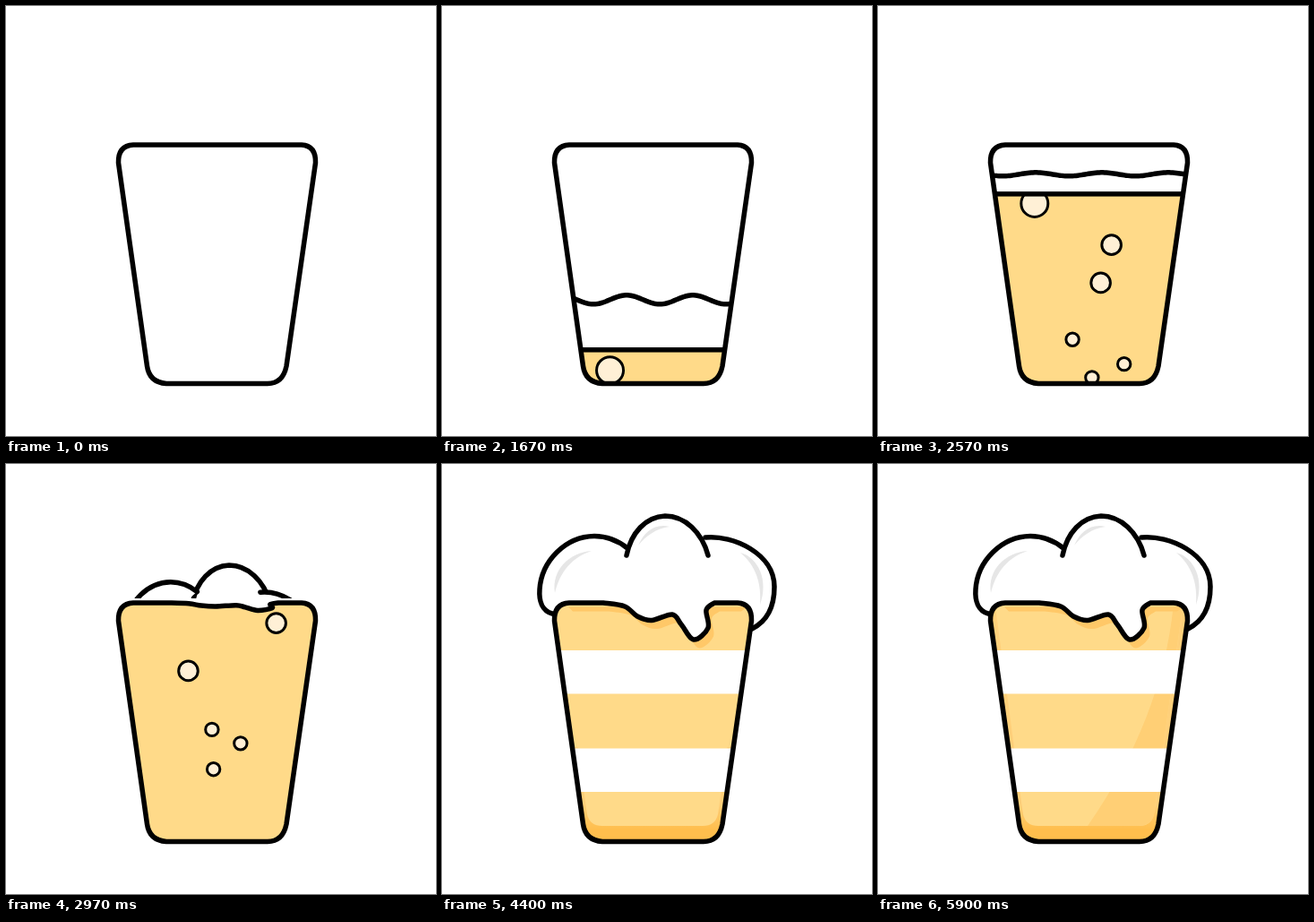
Write an HTML page with a canvas that moves like this. It is 480x480 px and loops after 9030 ms.

```html
<!DOCTYPE html>
<html lang="en">
<head>
<meta charset="utf-8">
<title>Filling glass</title>
<style>
  html, body { margin: 0; height: 100%; overflow: hidden; background: #fff; }
  canvas { display: block; width: 100%; height: 100%; }
</style>
</head>
<body>
<canvas id="stage" width="480" height="480"></canvas>
<script>
const ctx = document.getElementById('stage').getContext('2d');
const LOOP = 9030, RIM = 155, BASE = 421.5;
const AMBER = '#ffda89', SHADE = '#ffcf75', DEEP = '#ffbe4d';

const progress = (t, from, to) => Math.max(0, Math.min(1, (t - from) / (to - from)));
const lerp = (a, b, k) => a + (b - a) * k;
const easeOut = p => 1 - (1 - p) ** 2;
const easeInOut = p => p < .5 ? 2 * p * p : 1 - 2 * (1 - p) ** 2;

// Key points along the lower edge of the finished foam
const DRIP = [[180, 155], [204, 159], [218, 170], [234, 174.5], [257, 168],
  [267, 179], [281, 196], [297, 183], [295, 163], [304, 155]];

// Each puff swells out of its own anchor point
const puff = (x, y, shrink, line, gloss) =>
  ({ x, y, shrink, line: new Path2D(line), gloss: new Path2D(gloss) });
const PUFFS = [
  puff(250, 1158, .092, 'M206 102C211 77 227 59 249 58C271 58 290 76 297 102',
    'M219 91C226 75 238 66 254 70C239 72 228 80 219 91Z'),
  puff(239, 338, .366, 'M123 167C112 164 108 153 109 140C111 108 138 81 170 80.5C184 80.5 197 86 207 94',
    'M126 144C122 118 142 99 167 97C146 104 132 119 126 144Z'),
  puff(265, 258, .64, 'M294 82C325 79 371 100 371 137C371 163 360 177 346 184',
    'M333 99C353 104 365 130 355 157C357 133 350 113 333 99Z')
];

// Bubbles rise steadily along a bowed line
const BUBBLES = [
  { r: 15, born: 1568, life: 1343, from: 189, to: 170, bow: 0 },
  { r: 10.8, born: 1846, life: 1249, from: 270, to: 321, bow: -40 },
  { r: 10.8, born: 1960, life: 1426, from: 269, to: 130, bow: 40 },
  { r: 7.2, born: 2277, life: 1466, from: 194, to: 194, bow: 36 },
  { r: 7.2, born: 2442, life: 1266, from: 286, to: 326, bow: -42 },
  { r: 7.2, born: 2500, life: 1500, from: 242, to: 294, bow: -31 }
];

const INSET = new Path2D('M131 159L162 391Q165 404 179 404H291Q305 404 308 391L340 159Z');
const SHEEN = new Path2D('M234 404Q318 283 330 155H345V404Z');

function spline(path, pts) {
  path.lineTo(...pts[0]);
  for (let i = 0; i < pts.length - 1; i++) {
    const a = pts[i - 1] || pts[i], b = pts[i], c = pts[i + 1], d = pts[i + 2] || c;
    path.bezierCurveTo(b[0] + (c[0] - a[0]) / 6, b[1] + (c[1] - a[1]) / 6,
      c[0] - (d[0] - b[0]) / 6, c[1] - (d[1] - b[1]) / 6, c[0], c[1]);
  }
}

function glassPath(edge) {
  const p = new Path2D('M157.5 402L125.5 175Q125 156 142 155');
  spline(p, edge);
  p.lineTo(330, RIM);
  p.quadraticCurveTo(346, 156, 345.5, 175);
  p.lineTo(313, 402);
  p.quadraticCurveTo(309, BASE, 292, BASE);
  p.lineTo(179, BASE);
  p.quadraticCurveTo(160, 420, 157.5, 402);
  p.closePath();
  return p;
}

function foamPath(edge) {
  const p = new Path2D('M135 150L140 155');
  spline(p, edge);
  p.lineTo(328, RIM);
  p.lineTo(335, 150);
  return p;
}

function stroke(path, width = 5.5) {
  ctx.lineWidth = width;
  ctx.stroke(path);
}

function fill(color, path, rule = 'nonzero') {
  ctx.fillStyle = color;
  ctx.fill(path, rule);
}

// Runs `paint` with drawing limited to everything below y
function below(y, paint) {
  ctx.save();
  ctx.beginPath();
  ctx.rect(0, y, 480, 480);
  ctx.clip();
  paint();
  ctx.restore();
}

function drawPuffs(t) {
  const hidden = (1 - progress(t, 2782, 3502)) ** 2;
  for (const { x, y, shrink, line, gloss } of PUFFS) {
    const swell = new DOMMatrix().translate(x, y).scale(1 - shrink * hidden).translate(-x, -y);
    const outline = new Path2D(), shine = new Path2D();
    outline.addPath(line, swell);
    shine.addPath(gloss, swell);
    fill('#fff', outline);
    ctx.globalAlpha = progress(t, 3100, 3600);
    fill('#e6e6e6', shine);
    ctx.globalAlpha = 1;
    stroke(outline);
  }
}

function drawBubbles(t) {
  for (const { r, born, life, from, to, bow } of BUBBLES) {
    const u = (t - born) / life;
    if (u < 0 || u > 1) continue;
    const dot = new Path2D();
    dot.arc(lerp(from, to, u) + bow * 4 * u * (1 - u), lerp(428, 150, u), r, 0, 7);
    fill('#fff0d6', dot);
    stroke(dot, 3);
  }
}

function drawWave(t) {
  const k = (t - 1670) / 900;
  const mid = 328 - 140 * k, crest = 206 + 44 * k;
  const height = Math.max(0, Math.min(5, 5 - 3 * k));
  const wave = new Path2D();
  for (let x = 115; x <= 355; x += 2)
    wave.lineTo(x, mid - height * Math.cos((x - crest) / 74 * 2 * Math.PI));
  stroke(wave);
}

function drawInsetShade(t) {
  const top = lerp(BASE, 159, easeInOut(progress(t, 4020, 4870)));
  const rim = new Path2D();
  rim.rect(0, 0, 480, 480);
  rim.addPath(INSET);
  const tone = ctx.createLinearGradient(0, 380, 0, 408);
  tone.addColorStop(0, '#ffd07a');
  tone.addColorStop(1, DEEP);
  below(top, () => fill(tone, rim, 'evenodd'));
}

function drawSheen(t) {
  if (t < 5030) return;
  ctx.save();
  ctx.clip(INSET);
  ctx.translate(-215 * (1 - easeInOut(progress(t, 5000, 5900))), 0);
  fill(SHADE, SHEEN);
  ctx.restore();
}

function drawFoamShadow(t, foam, growth) {
  const settle = progress(t, 3830, 4300);
  ctx.save();
  ctx.translate(growth * lerp(5, 6, settle), growth * lerp(7.5, 9.5, settle));
  fill(`rgb(255,${lerp(190, 200, settle)},${lerp(77, 104, settle)})`, foam);
  ctx.restore();
}

function drawBands(t) {
  const width = 225 * easeOut(progress(t, 3830, 4330));
  ctx.fillStyle = '#fff';
  for (const y of [208, 317.5]) ctx.fillRect(125, y, width, 48.5);
}

function draw(t) {
  ctx.fillStyle = '#fff';
  ctx.fillRect(0, 0, 480, 480);
  ctx.strokeStyle = '#000';
  ctx.lineCap = ctx.lineJoin = 'round';

  const growth = progress(t, 2800, 3630);
  const edge = DRIP.map(([x, y]) => [x, lerp(RIM, y, growth)]);
  const glass = glassPath(edge), foam = foamPath(edge);
  const level = 384 - (t - 1670) * .1933;

  if (t > 2782) {
    drawPuffs(t);
    fill('#fff', foam);
  }
  fill('#fff', glass);

  ctx.save();
  ctx.clip(glass);
  if (t > 1030 && t < 2850) drawWave(t);
  below(Math.max(level, 0), () => {
    ctx.fillStyle = AMBER;
    ctx.fillRect(0, 0, 480, 480);
    drawBubbles(t);
    drawInsetShade(t);
    drawSheen(t);
    if (growth) drawFoamShadow(t, foam, growth);
  });
  if (level > RIM) {
    ctx.fillStyle = '#000';
    ctx.fillRect(100, level - 2.75, 280, 5.5);
  }
  drawBands(t);
  ctx.restore();

  stroke(glass);
}

const began = performance.now();
function tick() {
  draw((performance.now() - began) % LOOP);
  requestAnimationFrame(tick);
}
tick();
</script>
</body>
</html>
```
